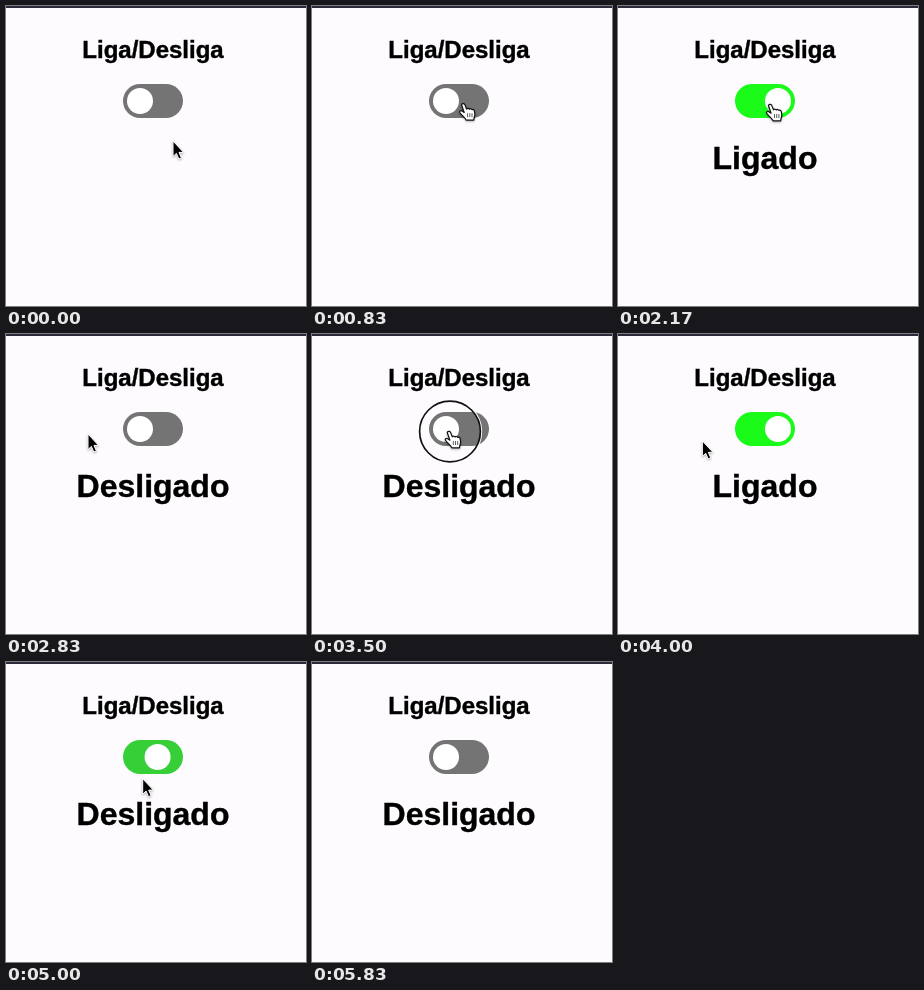
An HTML page for the animation above (5.99 s loop, 300 by 300 pixels).

```html
<!DOCTYPE html>
<html lang="pt">
<head>
<meta charset="utf-8">
<title>Liga/Desliga</title>
<style>
  html, body { margin: 0; width: 100%; height: 100%; overflow: hidden; background: #fefbff; }
  svg { display: block; width: 300px; height: 300px; }
  text {
    font-family: "Liberation Sans", Arial, sans-serif;
    font-weight: bold;
    text-anchor: middle;
    stroke: #000;
    stroke-width: .4px;
  }
  #arrow, #hand { filter: drop-shadow(0 1px 1px rgba(0, 0, 0, .3)); }
</style>
</head>
<body>
<svg viewBox="0 0 300 300">
  <rect width="300" height="2" fill="#2c2a3a"/>
  <text x="147" y="52" font-size="24">Liga/Desliga</text>
  <rect id="track" x="117" y="78" width="60" height="34" rx="17"/>
  <circle id="knob" cx="134" cy="95" r="13" fill="#fff"/>
  <text id="label" x="147" y="163" font-size="32"></text>
  <g id="cursor">
    <g id="ring" fill="none">
      <circle cx=".7" cy="-.5" r="31.4" stroke="#fff" stroke-width="1.6"/>
      <circle cx=".7" cy="-.5" r="30.4" stroke="#111" stroke-width="1.7"/>
    </g>
    <path id="arrow" stroke="#fff" d="M0 -1V14.5L3.4 11.4L5.8 17L8.4 15.9L6 10.4H10.6Z"/>
    <g id="hand">
      <path fill="#fff" stroke="#111" stroke-width="1.2" stroke-linejoin="round"
        d="M-2 .8C-2 -.9 .6 -1.1 1.2 .4L3 4.8C3.6 4 5.2 4 5.8 5C6.4 4.2 7.8 4.3 8.4 5.4C9.4 4.8 10.5 5.5 10.8 6.6L11.3 10C11.3 12 10.3 13 10.2 15.8H2.6C1.8 13.6 -1.2 11.6 -3.6 8.6C-4.8 7 -3 5.8 -1.6 6.8L.6 8.2Z"/>
      <path stroke="#333" stroke-width=".8" d="M4 9V13M6.2 9V13M8.4 9V13"/>
    </g>
  </g>
</svg>
<script>
  const LOOP = 5990, STEP = 1000 / 6;
  const FIRST = 6, GAP = 3.8, EXIT = 34;

  // The pointer alternates between resting places and presses on the switch.
  const stops = [
    { x: 167, y: 136 }, { x: 151.5, y: 98 },
    { x: 172, y: 169 }, { x: 152.5, y: 99 },
    { x: 82, y: 101 }, { x: 137.3, y: 98 },
    { x: 84, y: 108 }, { x: 134.5, y: 99.5 },
    { x: 150, y: 228 }
  ];

  const $ = id => document.getElementById(id);
  const clamp = (v, lo, hi) => Math.min(hi, Math.max(lo, v));
  const mix = (a, b, p) => a + (b - a) * p;
  const show = (id, visible) => $(id).style.display = visible ? "" : "none";

  function smooth(v) {
    const p = clamp(v, 0, 1);
    return p * p * (3 - 2 * p);
  }

  const pressStep = i => Math.round(FIRST + 2 * GAP * i);
  const presses = [0, 1, 2, 3].map(pressStep);

  function pointer(step) {
    const u = clamp((step - FIRST) / GAP + 1, 0, stops.length - 1);
    const i = Math.min(Math.floor(u), stops.length - 2);
    const a = stops[i], b = stops[i + 1];
    const p = smooth(1.7 * (u - i) - .3);
    return { x: mix(a.x, b.x, p), y: mix(a.y, b.y, p) };
  }

  function drawSwitch(step) {
    const count = presses.filter(p => step > p).length;
    const isOn = count % 2 === 1;
    const p = count ? smooth((step - presses[count - 1]) * .38) : 1;
    const level = isOn ? p : 1 - p;
    const green = mix(116, 251, level), other = mix(116, 26, level);
    $("track").setAttribute("fill", `rgb(${other}, ${green}, ${other})`);
    $("knob").setAttribute("cx", mix(134, 160, level));
    $("label").textContent = count ? (isOn ? "Ligado" : "Desligado") : "";
  }

  function drawCursor(step) {
    const { x, y } = pointer(step);
    const over = Math.abs(x - 147) < 30 && Math.abs(y - 95) < 17;
    $("cursor").setAttribute("transform", `translate(${x} ${y})`);
    show("cursor", step < EXIT);
    show("hand", over);
    show("arrow", !over);
    show("ring", presses.includes(step));
  }

  const start = performance.now();
  function tick() {
    const t = (performance.now() - start) % LOOP;
    const step = Math.floor((t + 5) / STEP);
    drawSwitch(step);
    drawCursor(step);
    requestAnimationFrame(tick);
  }
  tick();
</script>
</body>
</html>
```
